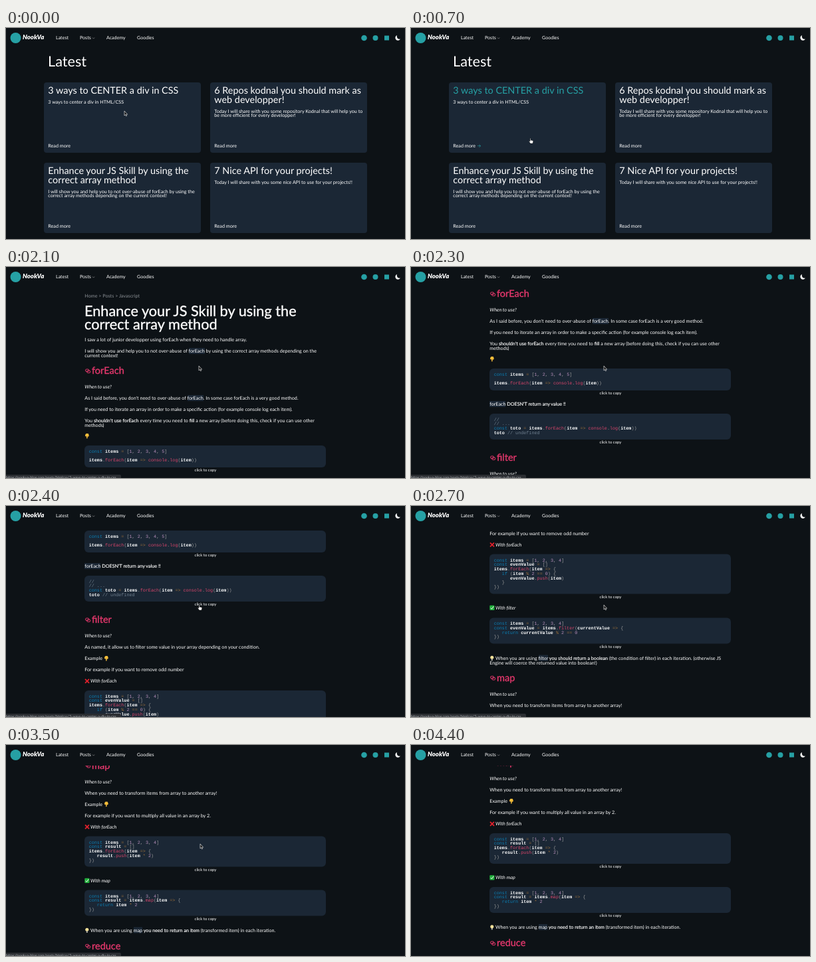
An HTML page that plays this animation: 600x318 px, repeating every 4500 ms.

```html
<!DOCTYPE html>
<html lang="en">
<head>
<meta charset="utf-8">
<title>Blog tour</title>
<style>
html, body { margin: 0; width: 100%; height: 100%; overflow: hidden; background: #0d1216; }
body { position: relative; color: #fff; font-family: Lato, "Open Sans", sans-serif; text-rendering: geometricPrecision; }
div, svg { position: absolute; }
.text { white-space: pre; line-height: 0; }
.layer { left: 0; top: 0; width: 100%; height: 100%; }
.box { background: #1b2735; }
svg { overflow: visible; }
i.arrow { font: 7px Inter, sans-serif; line-height: 0; color: #26a0a4; visibility: hidden; }
.hover .title { color: #26a0a4; }
.hover .arrow { visibility: visible; }
b { font-weight: 400; -webkit-text-stroke: .15px; }
.strong { -webkit-text-stroke: .35px; }
.pink { color: #e5386d; }
.mark { background: #1b2735; }
.code { font-family: "Liberation Mono", "DejaVu Sans Mono", monospace; font-weight: 700; }
.code span { font-weight: 400; }
.key { color: #0a7fb5; }
.fn { color: #d9466b; }
.num { color: #b78fbb; }
.op { color: #9a6e3a; }
.punct { color: #999; }
.note { color: #708090; }
#head { left: 0; top: 0; width: 100%; height: 31px; background: #0d1216; }
#status { left: 0; top: 313px; width: 173px; height: 5px; overflow: hidden; background: #2b2e32; color: #b4b8bc; border-top-right-radius: 2px; }
</style>
</head>
<body>
<div id="home" class="layer"></div>
<div id="post" class="layer"></div>
<div id="head"></div>
<div id="status"></div>
<svg id="cursor" width="1" height="1"><path id="arrow" d="M0 0v7l1.6-1.4 1 2.2 1-.5-1-2.1h2z" fill="#111" stroke="#fff" stroke-width=".6"/><path id="hand" d="M0 0c.8 0 1 .6 1 1v2l3 .7c.8.2.8 1 .6 1.8L4 8H.6l-2-3c-.3-.6.4-1 .9-.6l.6.6V1c0-.5.1-1-.1-1z" fill="#fff" stroke="#111" stroke-width=".4"/></svg>
<script>
const $ = id => document.getElementById(id);
const home = $('home'), post = $('post'), head = $('head');
const BODY = 7.2, TITLE = 14.4, BIG = 21.7;

function add(parent, html) {
  parent.insertAdjacentHTML('beforeend', html);
  return parent.lastElementChild;
}
// Text is centred vertically on y.
const text = (parent, x, y, size, html, cls = '', style = '') =>
  add(parent, `<div class="text ${cls}" style="left:${x}px;top:${y}px;font-size:${size}px;${style}">${html}</div>`);
const box = (parent, x, y, w, h, r) =>
  add(parent, `<div class="box" style="left:${x}px;top:${y}px;width:${w}px;height:${h}px;border-radius:${r}px"></div>`);

// Header
add(head, `<svg class="layer" width="600" height="31">
  <g fill="#26a0a4"><circle cx="14.5" cy="15" r="8"/><circle cx="538.5" cy="15" r="4.3"/>
  <circle cx="555.5" cy="15" r="4"/><rect x="569" y="11.5" width="7" height="7"/></g>
  <path d="M588 11a4 4 0 1 0 5 5.5a4 4 0 0 1-5-5.5z" fill="#fff"/>
  <path d="M130 14.5l1.6 1.6 1.6-1.6" fill="none" stroke="#aaa" stroke-width=".6"/></svg>`);
text(head, 25, 15, 9.6, 'NookVa', '', 'font-weight:900;font-style:italic');
[[75, 'Latest'], [111, 'Posts'], [151, 'Academy'], [197, 'Goodies']]
  .forEach(([x, s]) => text(head, x, 15, 7.1, s));
text($('status'), 0, 4.5, 5.4, 'https://nookva-blog.com/posts/htmlcss/3-ways-to-center-a-div-in-css');

// Home page
text(home, 63, 50, BIG, 'Latest');
const cards = [
  [57, 82, ['3 ways to CENTER a div in CSS'], ['3 ways to center a div in HTML/CSS']],
  [307, 82, ['6 Repos kodnal you should mark as', 'web developper!'],
    ['Today I will share with you some repository Kodnal that will help you to', 'be more efficient for every developper!']],
  [57, 203, ['Enhance your JS Skill by using the', 'correct array method'],
    ['I will show you and help you to not over-abuse of forEach by using the', 'correct array methods depending on the current context!']],
  [307, 203, ['7 Nice API for your projects!'], ['Today I will share with you some nice API to use for your projects!!']]
].map(([x, y, title, body]) => {
  const el = box(home, x, y, 235.5, 105.5, 4);
  title.forEach((s, i) => text(el, 6.3, 13 + i * 13.6, TITLE, s, 'title'));
  body.forEach((s, i) => text(el, 6.3, 16.5 + title.length * 13.6 + i * 6.7, BODY, s));
  text(el, 6.3, 96, BODY, 'Read more <i class="arrow">→</i>');
  return { el, x, y };
});

// Article
const icons = {
  down: '<path d="M2.6 0h3l1 2v2l-1 .8-1-.3V7q-.8 1-1.5 0V4.5L1 4l.3-2.5z" fill="#f6bd3a"/>',
  cross: '<path d="M1 .8l6 6M7 .8l-6 6" stroke="#e0202c" stroke-width="1.8"/>',
  tick: '<rect x=".3" y=".3" width="7.2" height="7.2" rx="1" fill="#22b03c"/><path d="M1.8 4l1.6 1.8L6.3 1.8" fill="none" stroke="#fff"/>',
  bulb: '<circle cx="3.8" cy="2.8" r="2.5" fill="#f7e29a"/><path d="M2.8 5h2v2.4h-2z" fill="#b9b9b0"/>',
  link: '<g fill="none" stroke="#e5386d" stroke-width="1"><rect x=".5" y="1" width="5.2" height="3.6" rx="1.8"/><rect x="2.6" y="3" width="5.2" height="3.6" rx="1.8"/></g>'
};
const icon = (name, x, y) =>
  add(post, `<svg style="left:${x}px;top:${y - 3.8}px" width="8" height="8">${icons[name]}</svg>`);
const para = (y, ...lines) => lines.forEach((s, i) => text(post, 118.3, y + i * 6.7, BODY, s));
const mark = s => `<span class="mark">${s}</span>`;
const section = (y, s) => {
  icon('link', 118.5, y);
  text(post, 129, y, 14.5, s, 'pink strong');
};
const italic = (y, s, x = 118.3) => text(post, x, y, BODY, s, '', 'font-style:italic');
const tip = (y, name, s) => {
  icon(name, 118.3, y);
  italic(y, s, 127);
};

const token = /(\/\/.*)|\b(const|return|if)\b|(console|\w+(?=\())|(\d+)|([=>%*]+)|([()[\]{},.]+)/g;
const kinds = ['note', 'key', 'fn', 'num', 'op', 'punct'];
const paint = s => s.replace(token, (m, ...groups) =>
  `<span class="${kinds[groups.findIndex(g => g)]}">${m.replace(/>/g, '&gt;')}</span>`);
const labels = [];
function block(y, ...lines) {
  const h = 19 + (lines.length - 1) * 6.75;
  box(post, 118.3, y, 363, h, 6);
  lines.forEach((s, i) => text(post, 124.7, y + 9.7 + i * 6.75, 6.75, paint(s), 'code'));
  text(post, 300, y + h + 5, 6, 'click to copy', '', 'transform:translateX(-50%)');
  labels.push(y + h + 5);
}

text(post, 118.3, 44, BODY, 'Home &gt; Posts &gt; Javascript', '', 'color:#8b9095');
text(post, 118, 66, BIG, 'Enhance your JS Skill by using the', 'strong');
text(post, 118, 86, BIG, 'correct array method', 'strong');
para(110, 'I saw a lot of junior developper using forEach when they need to handle array.');
para(127, `I will show you and help you to not over-abuse of ${mark('forEach')} by using the correct array methods depending on the`, 'current context!');
section(157, 'forEach');
italic(181, 'When to use?');
para(198, `As I said before, you don't need to over-abuse of ${mark('forEach')}. In some case forEach is a very good method.`);
para(215, 'If you need to iterate an array in order to make a specific action (for example console log each item).');
para(232, "You <b>shouldn't use forEach</b> every time you need to <b>fill</b> a new array (before doing this, check if you can use other", 'methods)');
icon('down', 118.3, 255);
block(269, 'const items = [1, 2, 3, 4, 5]', '', 'items.forEach(item => console.log(item))');
para(323, `${mark('forEach')} <b>DOESN'T return any value !!</b>`);
block(337, '//', '// ...', 'const toto = items.forEach(item => console.log(item))', 'toto // undefined');
section(404, 'filter');
italic(428, 'When to use?');
para(445, 'As named, it allow us to filter some value in your array depending on your condition.');
para(462, 'Example');
icon('down', 147, 462);
para(479, 'For example if you want to remove odd number');
tip(496, 'cross', 'With forEach');
block(510, 'const items = [1, 2, 3, 4]', 'const evenValue = []', 'items.forEach(item => {',
  '   if (item % 2 == 0) {', '      evenValue.push(item)', '   }', '})');
tip(591, 'tick', 'With filter');
block(605.5, 'const items = [1, 2, 3, 4]', 'const evenValue = items.filter(currentValue => {',
  '   return currentValue % 2 == 0', '})');
icon('bulb', 118.3, 667);
text(post, 127, 667, BODY, `When you are using ${mark('filter')} <b>you should return a boolean</b> (the condition of filter) in each iteration. (otherwise JS`);
para(673.5, 'Engine will coerce the returned value into boolean!)');
section(697, 'map');
italic(721, 'When to use?');
para(738, 'When you need to transform items from array to another array!');
para(755, 'Example');
icon('down', 147, 755);
para(772, 'For example if you want to multiply all value in an array by 2.');
tip(789, 'cross', 'With forEach');
block(803, 'const items = [1, 2, 3, 4]', 'const result = []', 'items.forEach(item => {', '   result.push(item * 2)', '})');
tip(870, 'tick', 'With map');
block(884, 'const items = [1, 2, 3, 4]', 'const result = items.map(item => {', '   return item * 2', '})');
icon('bulb', 118.3, 945);
text(post, 127, 945, BODY, `When you are using ${mark('map')} <b>you need to return an item</b> (transformed item) in each iteration.`);
section(969, 'reduce');

// Motion: rows of time followed by values
const path = [[0, 178, 125], [100, 170, 116], [200, 155, 97], [300, 145, 89], [400, 145, 89], [500, 155, 118],
  [700, 179, 166], [1000, 186, 164], [1300, 230, 145], [1500, 300, 120], [1600, 318, 107], [1700, 312, 150],
  [1800, 262, 225], [1900, 250, 235], [2100, 290, 149], [2800, 290, 149], [3000, 292, 149]];
const scroll = [[2200, 0], [2400, 232], [2600, 379], [2800, 496], [3000, 585], [3200, 635], [3400, 661], [3600, 670]];
const fade = [[1000, 0], [1200, 1], [4000, 1], [4200, 0]];

function at(keys, t) {
  const i = keys.findIndex(k => k[0] >= t);
  if (i < 0) return keys[keys.length - 1].slice(1);
  if (!i) return keys[0].slice(1);
  const a = keys[i - 1], b = keys[i], f = (t - a[0]) / (b[0] - a[0]);
  return a.slice(1).map((v, n) => v + (b[n + 1] - v) * f);
}
const cardAt = ([x, y]) => cards.find(c => x > c.x && x < c.x + 235.5 && y > c.y && y < c.y + 105.5);

function draw(now) {
  const t = Math.floor(now % 4500 / 100) * 100;
  const reading = t >= 2000, pos = at(path, t), [top] = at(scroll, t);
  home.style.display = reading ? 'none' : '';
  post.style.display = reading ? '' : 'none';
  post.style.transform = `translateY(${-top}px)`;

  // Card highlights lag one step behind the pointer.
  const hot = t >= 500 && cardAt(at(path, t - 100));
  cards.forEach(c => c.el.classList.toggle('hover', c === hot));

  const hand = reading ? labels.some(y => Math.abs(y - top - pos[1]) < 4) : t >= 500 && cardAt(pos);
  $('hand').style.display = hand ? '' : 'none';
  $('arrow').style.display = hand ? 'none' : '';
  $('cursor').style.transform = `translate(${pos[0]}px,${pos[1]}px)`;
  $('cursor').style.left = $('cursor').style.top = 0;
  $('cursor').style.display = t < 3600 ? '' : 'none';
  $('status').style.opacity = at(fade, t)[0];
  requestAnimationFrame(draw);
}
const start = performance.now();
requestAnimationFrame(function first() { draw(performance.now() - start); });
</script>
</body>
</html>
```
